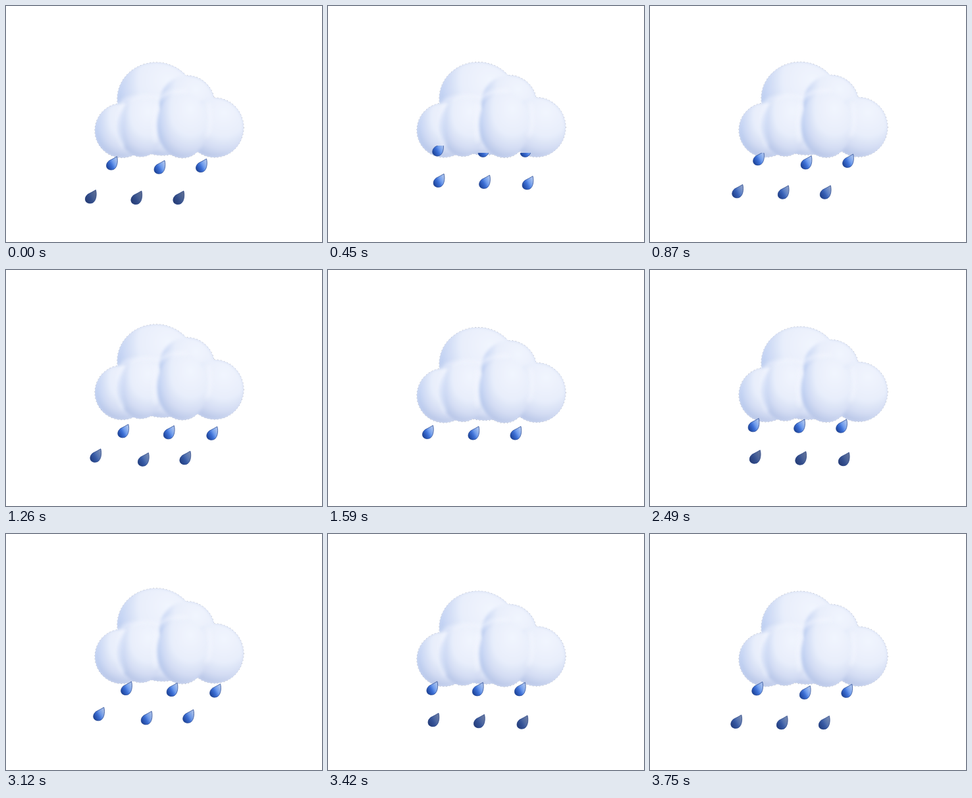
Animation of 480x360 px, one loop 3780 ms. Source, as an HTML page:

```html
<!DOCTYPE html>
<html lang="en">
<head>
<meta charset="utf-8">
<title>Rain cloud</title>
<style>
  html, body { margin: 0; width: 100%; height: 100%; overflow: hidden; background: #fff; }
  svg { display: block; width: 480px; height: 360px; }
</style>
</head>
<body>
<svg viewBox="0 0 480 360">
  <defs>
    <radialGradient id="puff" cx=".66" cy=".25" r=".88">
      <stop offset="0" stop-color="#f1f5fe"/>
      <stop offset=".45" stop-color="#e8eefb"/>
      <stop offset=".7" stop-color="#d3dcf3"/>
      <stop offset="1" stop-color="#a6b7df"/>
    </radialGradient>
    <linearGradient id="sky" x1="0" x2="1">
      <stop offset="0" stop-color="#a9c6f7" stop-opacity=".4"/>
      <stop offset=".3" stop-color="#c3d4f6" stop-opacity="0"/>
    </linearGradient>
    <linearGradient id="water" x1=".1" y1=".8" x2=".9" y2=".25">
      <stop offset="0" stop-color="#1f479f"/>
      <stop offset=".4" stop-color="#3d70d6"/>
      <stop offset=".65" stop-color="#6f9cec"/>
      <stop offset="1" stop-color="#a3bdec"/>
    </linearGradient>
    <filter id="soft"><feGaussianBlur stdDeviation="2"/></filter>
    <filter id="glow"><feGaussianBlur stdDeviation="3"/></filter>
    <clipPath id="outline"></clipPath>
    <clipPath id="front"><path d="M0 213H480V360H0z"/></clipPath>
    <clipPath id="under"><path d="M0 224H480V360H0z"/></clipPath>
    <path id="drop" d="M8-11.5C10-5 9 9-.5 9C-9.5 9-10-.5-4-5Q3-8.5 8-11.5z"/>
  </defs>
  <g id="cloud">
    <g id="rim" fill="none" stroke="#20253a" stroke-dasharray="1 4" opacity=".6"></g>
    <g clip-path="url(#outline)">
      <path fill="#d3dcf2" d="M120 70H380V250H120z"/>
      <g id="puffs"></g>
      <g fill="none" stroke="#f5f8ff" stroke-width="5" opacity=".7" filter="url(#glow)">
        <path d="M178 150Q166 185 178 215M228 146Q223 185 228 208M308 148Q314 180 304 200"/>
        <path d="M174 148Q200 132 231 141Q248 128 276 130"/>
      </g>
    </g>
  </g>
  <g id="rain"></g>
</svg>
<script>
const LOOP = 3780, CYCLE = LOOP / 4, START_Y = 206;
const $ = id => document.getElementById(id);

// cx, cy, rx, ry from back to front
const lobes = [
  [238, 200, 45, 28], [228, 141.5, 59, 55.5], [275, 149, 42, 43], [317, 185.5, 44, 45.5],
  [176, 190, 41, 41.5], [205, 184, 35, 46], [268, 182, 39, 50]
];
const ellipse = ([cx, cy, rx, ry], attrs = '') =>
  `<ellipse cx="${cx}" cy="${cy}" rx="${rx}" ry="${ry}" ${attrs}/>`;
$('outline').innerHTML = $('rim').innerHTML = lobes.map(l => ellipse(l)).join('');
$('puffs').innerHTML = lobes.map(l =>
  `<g filter="url(#soft)">${ellipse(l, 'fill="url(#puff)"')}${ellipse(l, 'fill="url(#sky)"')}</g>`).join('');

// x is the first drop's place at START_Y; the others sit at the given offsets
const rows = [
  { start: 676, speed: .13, x: 180.5, slope: .57, end: 297, offsets: [[0, 0], [72.5, 6], [136, 3.5]] },
  { start: 73, speed: .157, x: 197, slope: .47, end: 295, offsets: [[0, 0], [69.5, 2], [135, 3.5]] },
  { start: 372, speed: .15, x: 174, slope: .53, end: 300, offsets: [[0, 0], [69.5, 1.5], [133.5, 1.5]], front: true }
];
for (const row of rows) {
  row.drops = row.offsets.map(([dx, dy], i) => {
    const clip = row.front && i === 0 ? 'front' : 'under';
    $('rain').insertAdjacentHTML('beforeend', `<g clip-path="url(#${clip})"><g>
      <use href="#drop" fill="url(#water)" stroke="#23448f" stroke-width=".7"/>
      <use href="#drop" fill="#2e3a60"/></g></g>`);
    const node = $('rain').lastElementChild.firstElementChild;
    return { node, shade: node.lastElementChild, dx, dy };
  });
}

// time, height of the cloud's top
const bob = [[0, 86.5], [450, 86], [650, 87], [1230, 83.3], [1600, 88], [1850, 88], [1890, 86.5]];
function cloudTop(t) {
  const i = bob.findIndex(([time]) => time > t);
  const [t0, y0] = bob[i - 1], [t1, y1] = bob[i];
  const k = (t - t0) / (t1 - t0);
  return y0 + (y1 - y0) * k * k * (3 - 2 * k);
}

function draw(now) {
  const t = now % LOOP;
  $('cloud').setAttribute('transform', `translate(0 ${cloudTop(t % (LOOP / 2)) - 86.5})`);

  const rainTime = t + 20 * Math.sin(2 * Math.PI * t / LOOP);
  for (const row of rows) {
    const age = (rainTime - row.start + 2 * CYCLE) % CYCLE;
    const fall = age * row.speed, left = row.end - START_Y - fall;
    const dark = Math.min(.85, Math.max(0, 1 - left / 22));
    for (const { node, shade, dx, dy } of row.drops) {
      node.setAttribute('visibility', left > 0 ? 'visible' : 'hidden');
      node.setAttribute('transform', `translate(${row.x - row.slope * fall + dx} ${START_Y + fall + dy})`);
      shade.setAttribute('opacity', dark);
    }
  }
}

const begin = performance.now();
(function tick() {
  draw(performance.now() - begin);
  requestAnimationFrame(tick);
})();
</script>
</body>
</html>
```
